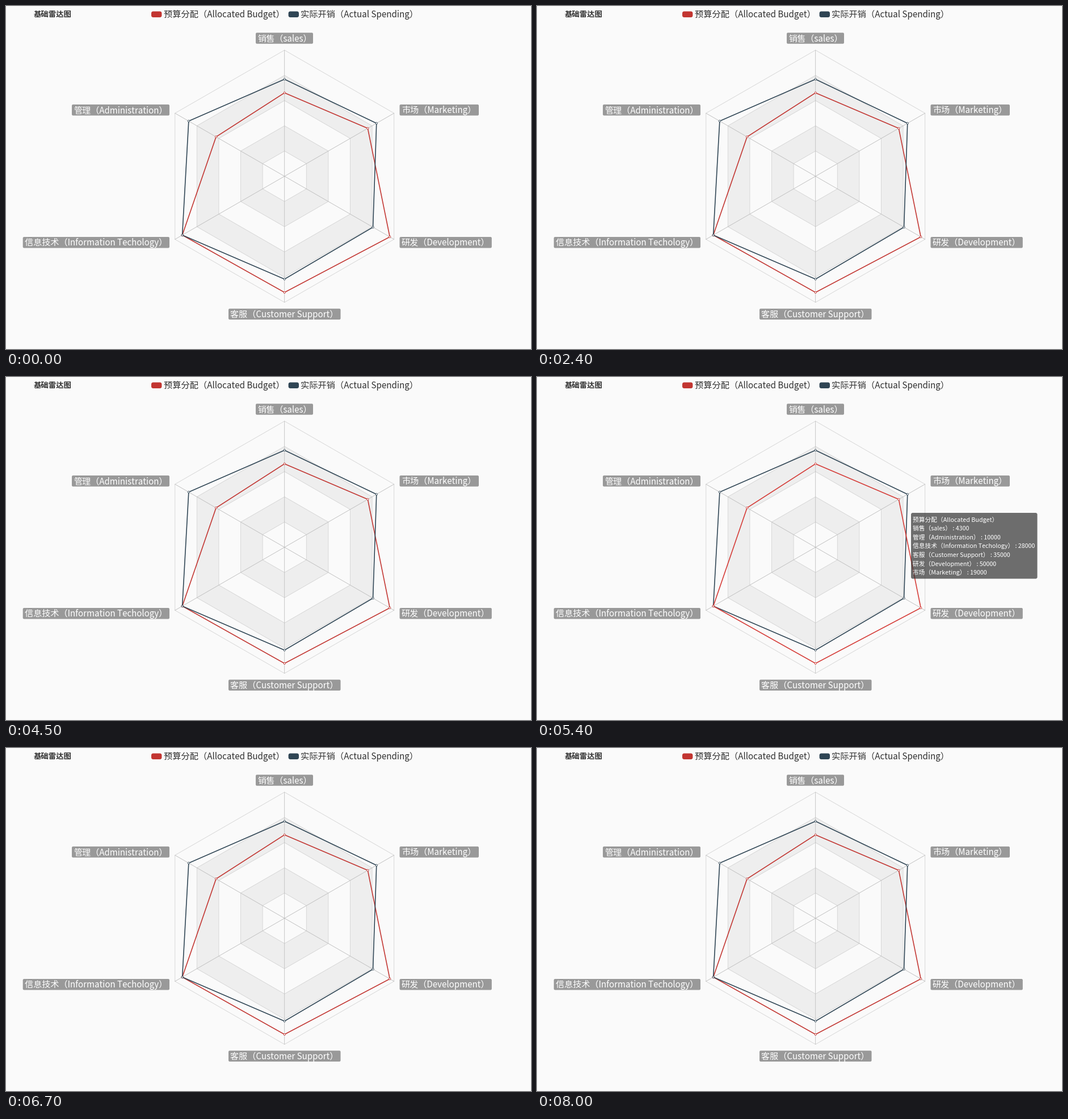
Write a matplotlib script that moves like this. It is 925 px wide and 606 px high and loops after 9.8 s.

```python
import numpy as np
import matplotlib.pyplot as plt
from matplotlib.animation import FuncAnimation
from matplotlib.patches import Circle, FancyBboxPatch, Polygon

W, H, DPI = 925, 606, 64
PT = 72 / DPI  # points per pixel
STEP, FRAMES = 100, 98

RED, RED_HOVER, NAVY = "#c23531", "#d53a36", "#2f4554"
CENTER, RADIUS = np.array([490.7, 300.8]), 222.8

plt.rcParams["font.family"] = ["Noto Sans CJK JP", "DejaVu Sans"]

# name, maximum, label box (x, y, width, height)
AXES = [
    ("销售（sales）", 6500, (440, 47.2, 101, 19.5)),
    ("管理（Administration）", 16000, (116, 174, 172, 19.5)),
    ("信息技术（Information Techology）", 30000, (29.7, 408, 258.3, 19.5)),
    ("客服（Customer Support）", 38000, (392, 534.7, 197.5, 19.3)),
    ("研发（Development）", 52000, (693.5, 408, 162.3, 19.5)),
    ("市场（Marketing）", 25000, (693.5, 174, 139.5, 19.5)),
]
BUDGET = ("预算分配（Allocated Budget）", [4300, 10000, 28000, 35000, 50000, 19000])
SPENDING = ("实际开销（Actual Spending）", [5000, 14000, 28000, 31000, 42000, 21000])

# Tooltip visits: first frame, end frame, series, path of (frame, x, y)
VISITS = [
    (21, 24, SPENDING, [(21, 491, 301), (22, 599, 258), (23, 653, 229)]),
    (38, 45, SPENDING, [(38, 664, 220.8), (42, 661.5, 220.5)]),
    (54, 67, BUDGET, [(54, 659, 240), (56, 656, 235), (58, 654.3, 232.5)]),
    (77, 80, SPENDING, [(77, 653.3, 247.2), (78, 658, 279), (79, 661, 397.3)]),
]
HOVER = range(54, 65)

fig = plt.figure(figsize=(W / DPI, H / DPI), dpi=DPI, facecolor="#fafafa")
ax = fig.add_axes([0, 0, 1, 1])
ax.set_xlim(0, W)
ax.set_ylim(H, 0)
ax.axis("off")


def box(x, y, w, h, color, r, **kw):
    patch = FancyBboxPatch((x, y), w, h, boxstyle=f"round,pad=0,rounding_size={r}",
                           fc=color, ec="none", lw=0, **kw)
    return ax.add_patch(patch)


def label(x, mid, text, size, color, **kw):
    return ax.text(x, mid + 0.38 * size, text, size=size * PT, color=color,
                   va="baseline", ha="left", **kw)


angles = np.pi / 2 + np.arange(6) * np.pi / 3
SPOKES = np.column_stack([np.cos(angles), -np.sin(angles)])


def ring(scale):
    return CENTER + SPOKES * RADIUS * np.reshape(scale, (-1, 1))


# Grid
for k in range(5, 0, -1):
    fill = "#eeeeee" if k % 2 == 0 else "#fafafa"
    ax.add_patch(Polygon(ring(k / 5), fc=fill, ec="#d2d2d2", lw=0.8 * PT, zorder=1))
for x, y in ring(1):
    ax.plot([CENTER[0], x], [CENTER[1], y], color="#bbbbbb", lw=0.8 * PT,
            snap=False, zorder=2)


def series(values, color, z):
    pts = ring(np.array(values) / [a[1] for a in AXES])
    line = ax.add_patch(Polygon(pts, fill=False, ec=color, lw=1.6 * PT,
                                joinstyle="round", zorder=z))
    dots = [ax.add_patch(Circle(p, 1.6, fc="white", ec=color, lw=0.8 * PT, zorder=z))
            for p in pts]
    return [line, *dots]


red_parts = series(BUDGET[1], RED, 3)
series(SPENDING[1], NAVY, 4)

# Title, legend and axis names
label(48.7, 14, "基础雷达图", 13.4, "#333333", weight="bold")
for x, (name, _), color in [(256, BUDGET, RED), (497.6, SPENDING, NAVY)]:
    box(x, 9.5, 18.4, 10.5, color, 3.5)
    label(x + 21.8, 14.3, name, 15.2, "#333333")
for name, _, (x, y, w, h) in AXES:
    box(x, y, w, h, "#999999", 2.2, zorder=5)
    label(x + 3.4, y + h / 2 - 0.2, name, 15.1, "white", zorder=6)

# Tooltip
TIP_SIZE, TIP_PITCH = 10.7, 15.6
tip = box(0, 0, 222.5, 116.4, "#323232", 3, alpha=0.7, zorder=8)
rows = [label(0, 0, "", TIP_SIZE, "white", zorder=9) for _ in range(7)]


def place_tip(x, y, name, values):
    tip.set_x(x)
    tip.set_y(y)
    texts = [name] + [f"{a[0]} : {v}" for a, v in zip(AXES, values)]
    for i, (row, text) in enumerate(zip(rows, texts)):
        row.set_text(text)
        row.set_position((x + 3.4, y + 11.6 + i * TIP_PITCH + 0.38 * TIP_SIZE))


def update(n):
    # The hovered series is brighter and rises above the other one
    color, z = (RED_HOVER, 4.5) if n in HOVER else (RED, 3)
    for part in red_parts:
        part.set_edgecolor(color)
        part.set_zorder(z)
    visit = next((v for v in VISITS if v[0] <= n < v[1]), None)
    for part in [tip, *rows]:
        part.set_visible(visit is not None)
    if visit:
        t, xs, ys = zip(*visit[3])
        place_tip(np.interp(n, t, xs), np.interp(n, t, ys), *visit[2])
    return [tip, *rows, *red_parts]


anim = FuncAnimation(fig, update, frames=FRAMES, interval=STEP,
                     init_func=lambda: update(0), repeat=True, repeat_delay=0)
plt.show()
```
